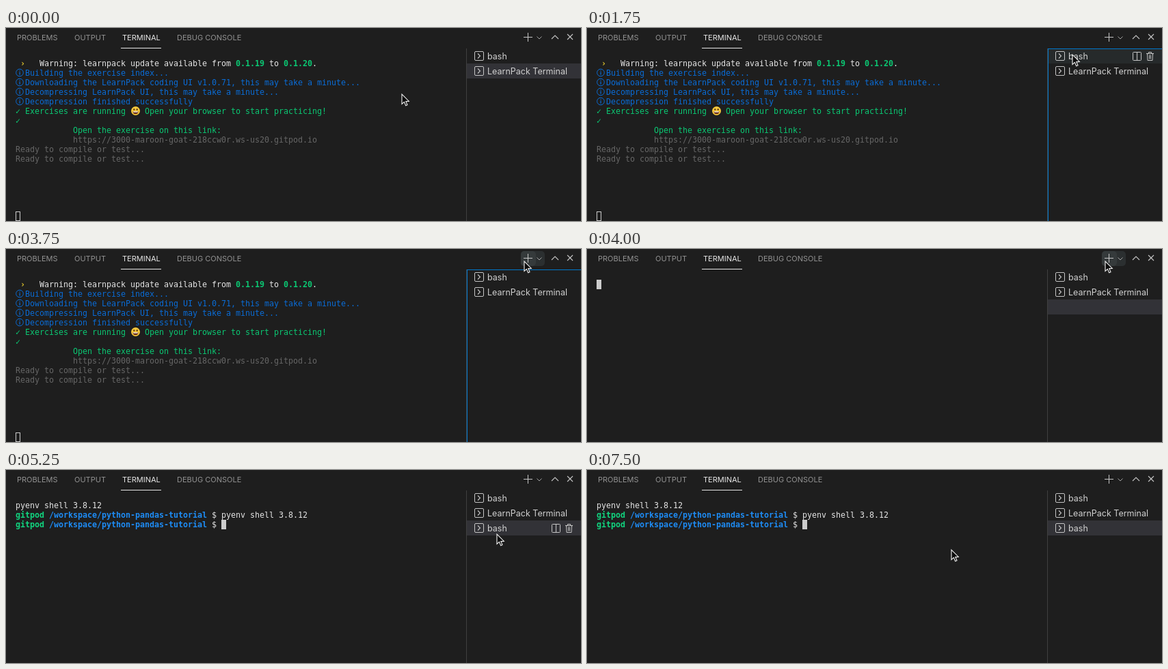
An HTML page with a canvas that plays this animation: 841x283 px, repeating every 8000 ms.

```html
<!DOCTYPE html>
<html lang="en">
<head>
<meta charset="utf-8">
<title>Terminal panel</title>
<style>
  html, body { margin: 0; width: 100%; height: 100%; overflow: hidden; background: #1e1e1e; }
  canvas { display: block; }
</style>
</head>
<body>
<canvas id="stage" width="841" height="283"></canvas>
<script>
const ctx = document.getElementById('stage').getContext('2d');
const LOOP = 8000;
const COL = 7, LINE = 14, LEFT = 14, TOP = 45;
const UI = 'Inter, sans-serif';
const MONO = '"DejaVu Sans Mono", monospace';
const C = {
  bg: '#1e1e1e', white: '#e5e5e5', caret: '#cccccc', gray: '#666666',
  blue: '#0a6cd6', green: '#0bc873', prompt: '#11d680', path: '#1e8cf5',
  yellow: '#e3c62c', icon: '#c5c5c5', selected: '#323237', hover: '#262a2b', focus: '#0078cc'
};

// time, pointer tip x, y, hovered item (sidebar row or "add")
const POINTER = [
  [0, 579, 97], [250, 620, 104], [500, 632, 104], [750, 737, 266], [1000, 729, 265],
  [1250, 716, 78], [1500, 710, 45, 0], [1750, 710, 39, 0], [2000, 721, 67, 1],
  [2500, 721, 61, 1], [2750, 722, 47, 0], [3500, 755, 25, 'add'], [3750, 758, 18, 'add'],
  [4750, 757, 17, 'add'], [5000, 725, 72, 1], [5250, 718, 94, 2], [5750, 716, 86, 2],
  [6500, 621, 115], [6750, 619, 115], [7000, 574, 116], [7250, 533, 117]
];

function text(str, x, y, font, color) {
  ctx.font = font;
  ctx.fillStyle = color;
  ctx.fillText(str, x, y);
}

function mono(str, col, row, color, bold) {
  text(str, LEFT + col * COL, TOP + row * LINE + 11, `${bold ? 'bold ' : ''}11.63px ${MONO}`, color);
}

function rect(x, y, w, h, color) {
  ctx.fillStyle = color;
  ctx.fillRect(x, y, w, h);
}

function roundRect(x, y, w, h, r, color, stroke) {
  ctx.beginPath();
  ctx.roundRect(x, y, w, h, r);
  if (stroke) { ctx.strokeStyle = color; ctx.lineWidth = 1; ctx.stroke(); }
  else { ctx.fillStyle = color; ctx.fill(); }
}

function line(color, width, ...points) {
  ctx.beginPath();
  points.forEach(([x, y]) => ctx.lineTo(x, y));
  ctx.strokeStyle = color;
  ctx.lineWidth = width;
  ctx.stroke();
}

function disc(x, y, r, color) {
  ctx.beginPath();
  ctx.arc(x, y, r, 0, Math.PI * 2);
  ctx.fillStyle = color;
  ctx.fill();
}

function header(hover) {
  [['PROBLEMS', 16], ['OUTPUT', 100], ['TERMINAL', 170], ['DEBUG CONSOLE', 250]].forEach(([label, x]) =>
    text(label, x, 18, `11px ${UI}`, label === 'TERMINAL' ? '#e7e7e7' : '#929292'));
  rect(168, 29, 59, 1, '#e7e7e7');
  if (hover === 'add') {
    roundRect(753, 3, 35, 22, 5, '#2b2f30');
    roundRect(753, 3, 22, 22, 5, '#353a3b');
  }
  line(C.icon, 1, [757, 13.5], [770, 13.5]);
  line(C.icon, 1, [763.5, 7], [763.5, 20]);
  line('#a5a5a5', 1, [776.5, 12.5], [780, 16], [783.5, 12.5]);
  line(C.icon, 1.1, [798, 16], [803, 11], [808, 16]);
  line(C.icon, 1.1, [821, 9], [829, 17]);
  line(C.icon, 1.1, [829, 9], [821, 17]);
}

function rowActions(y) {
  roundRect(798.5, y + 5.5, 12, 12, 1, C.icon, true);
  line(C.icon, 1, [804.5, y + 5], [804.5, y + 18]);
  line(C.icon, 1.1, [818, y + 7.5], [829, y + 7.5]);
  line(C.icon, 1, [821.5, y + 7], [821.5, y + 5.5], [825.5, y + 5.5], [825.5, y + 7]);
  line(C.icon, 1, [819.5, y + 8], [820, y + 17.5], [827, y + 17.5], [827.5, y + 8]);
  line(C.icon, 1, [822.5, y + 9.5], [822.5, y + 15.5]);
  line(C.icon, 1, [824.5, y + 9.5], [824.5, y + 15.5]);
}

function sidebar(t, hover) {
  const focused = t >= 1000 && t < 4000;
  const selected = t < 1000 ? 1 : t >= 4000 ? 2 : -1;
  const labels = ['bash', 'LearnPack Terminal'];
  if (t >= 4500) labels.push('bash');

  rect(673, 30, 1, 253, '#404040');
  if (selected >= 0) rect(674, 30 + selected * 22, 167, 22, C.selected);
  labels.forEach((label, i) => {
    const y = 30 + i * 22;
    const hovered = hover === i;
    if (hovered && i !== selected) rect(674, y, 167, 22, C.hover);
    roundRect(685.5, y + 4.5, 13, 13, 1.5, C.icon, true);
    line(C.icon, 1.1, [690, y + 7.5], [693.5, y + 11], [690, y + 14.5]);
    text(hovered && i === 1 ? 'LearnPack T...' : label, 704, y + 16, `12.5px ${UI}`, '#d0d0d0');
    if (hovered) rowActions(y);
  });
  if (focused) {
    rect(674, 30, 167, 1, C.focus);
    rect(674, 30, 1, 253, C.focus);
  }
}

function infoMark(row) {
  const y = TOP + row * LINE + 6.5;
  ctx.beginPath();
  ctx.arc(20, y, 5.3, 0, Math.PI * 2);
  ctx.strokeStyle = C.blue;
  ctx.lineWidth = 1;
  ctx.stroke();
  rect(19.5, y - 1, 1.2, 4.2, C.blue);
  rect(19.5, y - 3.2, 1.2, 1.2, C.blue);
}

function smiley(x, y) {
  disc(x, y, 6.5, '#f7c93c');
  disc(x - 2.2, y - 2, 1.2, '#5a3413');
  disc(x + 2.2, y - 2, 1.2, '#5a3413');
  ctx.beginPath();
  ctx.arc(x, y + 0.8, 4, 0, Math.PI);
  ctx.fillStyle = '#6b2f16';
  ctx.fill();
  rect(x - 3.3, y + 0.8, 6.6, 1.3, '#ffffff');
}

function exerciseLog() {
  mono('›', 1, 0, C.yellow, true);
  mono('Warning: learnpack update available from', 5, 0, C.white);
  mono('0.1.19', 46, 0, C.green, true);
  mono('to', 53, 0, C.white);
  mono('0.1.20', 56, 0, C.green, true);
  mono('.', 62, 0, C.white);
  [
    'Building the exercise index...',
    'Downloading the LearnPack coding UI v1.0.71, this may take a minute...',
    'Decompressing LearnPack UI, this may take a minute...',
    'Decompression finished successfully'
  ].forEach((str, i) => {
    infoMark(i + 1);
    mono(str, 2, i + 1, C.blue);
  });
  mono('✓ Exercises are running', 0, 5, C.green);
  smiley(189.5, 121.5);
  mono('Open your browser to start practicing!', 27, 5, C.green);
  mono('✓', 0, 6, C.green);
  mono('Open the exercise on this link:', 12, 7, C.green);
  mono('https://3000-maroon-goat-218ccw0r.ws-us20.gitpod.io', 12, 8, C.gray);
  mono('Ready to compile or test...', 0, 9, C.gray);
  mono('Ready to compile or test...', 0, 10, C.gray);
  ctx.strokeStyle = C.caret;
  ctx.lineWidth = 1;
  ctx.strokeRect(14.5, 269.5, 6, 13);
}

function promptLine(row, command) {
  mono('gitpod', 0, row, C.prompt, true);
  mono('/workspace/python-pandas-tutorial', 7, row, C.path, true);
  mono('$ ' + command, 41, row, C.white);
}

function shell(t) {
  const command = 'pyenv shell 3.8.12';
  let col = 0, row = 0;
  if (t >= 4750) {
    mono(command, 0, 0, C.white);
    row = 1;
  }
  if (t >= 5250) {
    promptLine(1, command);
    promptLine(2, '');
    col = 43;
    row = 2;
  }
  rect(LEFT + col * COL, TOP + row * LINE, COL, LINE, C.caret);
}

function pointer(x, y) {
  ctx.beginPath();
  [[0, 0], [0, 14.5], [3.4, 11.4], [5.7, 16.8], [8, 15.8], [5.8, 10.6], [10.3, 10.4]]
    .forEach(([dx, dy]) => ctx.lineTo(x + dx, y + dy));
  ctx.closePath();
  ctx.fillStyle = '#0a0a0a';
  ctx.fill();
  ctx.strokeStyle = '#f2f2f2';
  ctx.lineWidth = 1.1;
  ctx.stroke();
}

function draw(t) {
  const [, x, y, hover] = POINTER.findLast(([start]) => start <= t);
  rect(0, 0, 841, 283, C.bg);
  header(hover);
  if (t < 4000) exerciseLog();
  else shell(t);
  sidebar(t, hover);
  pointer(x, y);
}

const begin = performance.now();
function tick() {
  draw((performance.now() - begin) % LOOP);
  requestAnimationFrame(tick);
}
tick();
</script>
</body>
</html>
```
